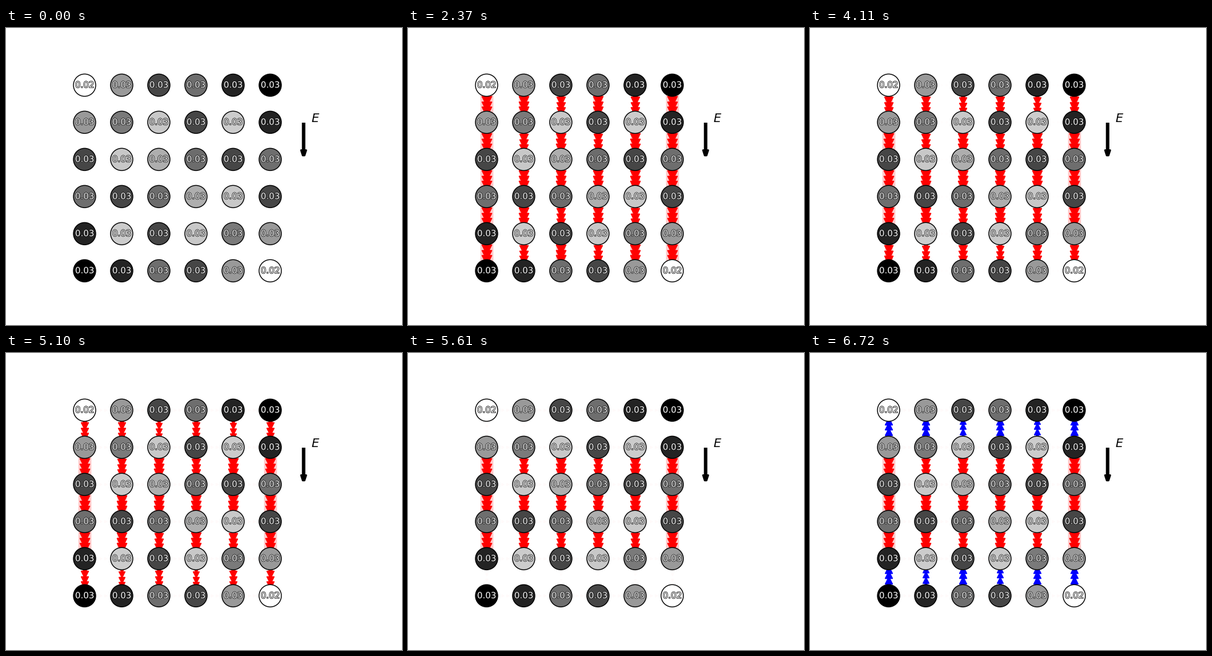
Write a matplotlib script that moves like this. It is 640 px wide and 480 px high and loops after 6750 ms.

```python
import numpy as np
import matplotlib.pyplot as plt
from matplotlib.animation import FuncAnimation
from matplotlib.patches import Circle
from matplotlib.patheffects import withStroke

W, H, DPI = 640, 480, 100
STEP_MS, FRAMES = 30, 225
N, GAP, X0, Y0, RADIUS = 6, 60, 127.0, 92.4, 18
PT = 72 / DPI  # points per pixel

# Grey levels of each ring, outermost first, from its light to its dark corner.
RINGS = [255, 153, 70, 110, 35, 0], [122, 200, 70, 204], [174, 108]

fig = plt.figure(figsize=(W / DPI, H / DPI), dpi=DPI)
ax = fig.add_axes([0, 0, 1, 1])
ax.set(xlim=(0, W), ylim=(H, 0))
ax.axis("off")


def node(row, col):
    return X0 + GAP * col, Y0 + GAP * row


def shade(row, col):
    ring = min(row, col, N - 1 - row, N - 1 - col)
    return RINGS[ring][abs(row - col)]


def base_current(row, col):
    """Strong side columns; inner ones alternate, more so away from the middle."""
    if col in (0, N - 1):
        return 1.03
    s = 2 - row
    return 0.6 + 0.15 / (1 + 5 * s * s) - 0.075 * s * (-1) ** (row + col)


def edge_factor(t):
    """Flow through the top and bottom bonds: it fades, then reverses."""
    return np.interp(t, [3690, 4110, 5100, 5610, 5820, 6720],
                     [1, .6, .25, .001, -.11, -.27])


def inner_factor(t):
    return np.interp(t, [390, 1050], [.97, 1])


class Bond:
    def __init__(self, start, end):
        xs, ys = zip(start, end)
        self.markers = "v^" if xs[0] == xs[1] else "><"
        self.band, = ax.plot(xs, ys, solid_capstyle="butt", zorder=1)
        self.heads, = ax.plot(np.linspace(*xs, 8), np.linspace(*ys, 8),
                              ls="none", zorder=2)

    def show(self, current, visible):
        size = abs(current)
        color = "red" if current > 0 else "blue"
        alpha = min(1, size / 0.1)
        self.band.set(color=color, lw=20.5 * PT * size, alpha=0.2 * alpha,
                      visible=visible)
        self.heads.set(color=color, alpha=alpha, visible=visible,
                       marker=self.markers[int(current < 0)],
                       markersize=16.3 * PT * size ** 0.2)


bonds = {(r, c): Bond(node(r, c), node(r + 1, c))
         for r in range(N - 1) for c in range(N)}
leaks = [Bond(node(r, c), node(r, c + 1))
         for r in range(N) for c in range(N - 1)]

for r in range(N):
    for c in range(N):
        x, y = node(r, c)
        level = shade(r, c)
        ax.add_patch(Circle((x, y), RADIUS, fc=str(level / 255),
                            ec="black", lw=1, zorder=3))
        ax.text(x, y, "0.02" if level == 255 else "0.03",
                color="white", size=10, ha="center", va="center", zorder=4,
                path_effects=[withStroke(linewidth=1, foreground="black")])

# Field direction
ax.plot([481, 481], [153.4, 200], color="black", lw=4, solid_capstyle="butt")
ax.fill([476.8, 485.2, 482.5, 479.5], [197.5, 197.5, 206, 206],
        fc="black", ec="black", lw=2, joinstyle="round")
ax.text(493, 152.4, "$E$", size=14)


def draw(frame):
    t = frame * STEP_MS
    flowing = frame > 0
    for (r, c), bond in bonds.items():
        factor = edge_factor if r in (0, N - 2) else inner_factor
        bond.show(base_current(r, c) * factor(t), flowing)
    for leak in leaks:
        leak.show(0.0012 * np.interp(t, [3700, 5100], [0, 1]), flowing)
    return []


anim = FuncAnimation(fig, draw, frames=FRAMES, interval=STEP_MS,
                     repeat=True, repeat_delay=0)
plt.show()
```
